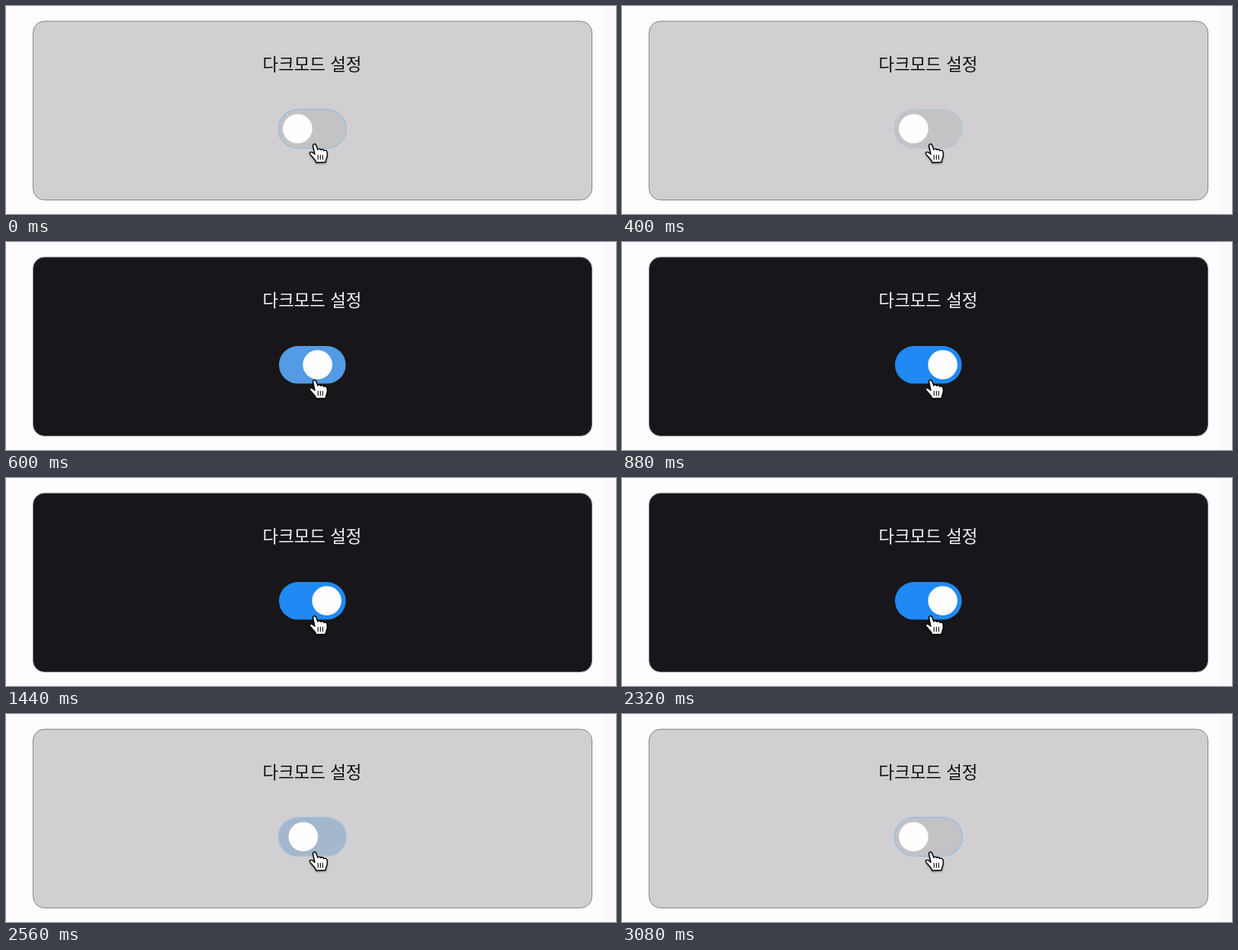
Recreate the animation shown at these times as an HTML page. Size 800 px wide and 274 px high, loop 3400 ms.

```html
<!DOCTYPE html>
<html lang="ko">
<head>
<meta charset="utf-8">
<style>
  html, body { margin: 0; height: 100%; overflow: hidden; background: #fefcff; }
  svg { display: block; width: 800px; height: 274px; }
  text { font: 22.4px "Noto Sans CJK KR", "Noto Sans CJK", sans-serif; text-anchor: middle; }
</style>
</head>
<body>
<svg viewBox="0 0 800 274">
  <defs>
    <filter id="soft" x="-30%" y="-30%" width="160%" height="170%">
      <feDropShadow dx="0" dy="1.2" stdDeviation="1" flood-opacity=".4"/>
    </filter>
  </defs>
  <rect x="783" width="17" height="274" fill="#fbf9fc"/>
  <rect id="card" x="35.5" y="20" width="733" height="235.5" rx="15" stroke="#7c7a7d" stroke-width=".9"/>
  <text id="title" x="401.5" y="85.3">다크모드 설정</text>
  <rect id="glow" x="357.4" y="136.4" width="88.8" height="50.7" rx="25.3" fill="none" stroke="#8fbbe2" stroke-width="1.3"/>
  <rect id="track" x="358" y="137" width="87.6" height="49.6" rx="24.8"/>
  <circle id="knob" cy="161.7" r="19.3" fill="#fefdff"/>
  <g filter="url(#soft)" stroke="#000" stroke-linecap="round" stroke-linejoin="round">
    <path fill="#fff" stroke-width="1.4" d="M402.7 185 C401.8 181.6 405.6 180.5 406.8 183.8
      L408.9 189.3 C409.7 187.6 412.4 187.8 412.9 189.6 C414 188.2 416.5 188.8 416.9 190.6
      C418.3 189.6 420.7 190.4 421 192.4 C421.6 195.6 421.5 198.5 420.2 201 C419.4 202.6 419.2 204 419.2 205.8
      L406.8 206.2 C406.4 203.2 402.8 200.2 401 197.8 C399.6 196.4 397.7 194.8 398.4 193.3
      C399.4 191.4 402.6 192.6 405 195.4 Z"/>
    <path fill="none" stroke-width="1.1" d="M409.2 196.5 V202 M412.3 196.5 V202 M415.4 196.5 V202"/>
  </g>
</svg>
<script>
const LOOP = 3400, PRESS = 360, DARK_AT = 440, LIGHT_AT = 2360, SLIDE = 400;
const OFF = [195, 194, 196], ON = [32, 137, 243];
const [card, title, glow, track, knob] =
  ['card', 'title', 'glow', 'track', 'knob'].map(id => document.getElementById(id));

const clamp = v => Math.min(1, Math.max(0, v));
const mix = (a, b, k) => a + (b - a) * k;

// CSS "ease": cubic-bezier(.25, .1, .25, 1)
function ease(x) {
  if (x <= 0 || x >= 1) return clamp(x);
  const bezier = (a, b, u) => 3 * a * u * (1 - u) ** 2 + 3 * b * u * u * (1 - u) + u ** 3;
  let lo = 0, hi = 1;
  for (let i = 0; i < 20; i++) {
    const mid = (lo + hi) / 2;
    if (bezier(.25, .25, mid) < x) lo = mid; else hi = mid;
  }
  return bezier(.1, 1, lo);
}

function draw() {
  const t = performance.now() % LOOP;
  const dark = t >= DARK_AT && t < LIGHT_AT;
  const back = ease((t - LIGHT_AT) / SLIDE);
  const on = ease((t - DARK_AT) / SLIDE) - back;

  card.setAttribute('fill', dark ? '#18161a' : '#d1cfd2');
  title.setAttribute('fill', dark ? '#f4f2f5' : '#111012');
  track.setAttribute('fill', `rgb(${OFF.map((c, i) => mix(c, ON[i], on))})`);
  knob.setAttribute('cx', mix(382.4, 420.6, on));
  glow.setAttribute('opacity', 1 - clamp((t - PRESS) / (DARK_AT - PRESS)) + back);
  requestAnimationFrame(draw);
}
draw();
</script>
</body>
</html>
```
